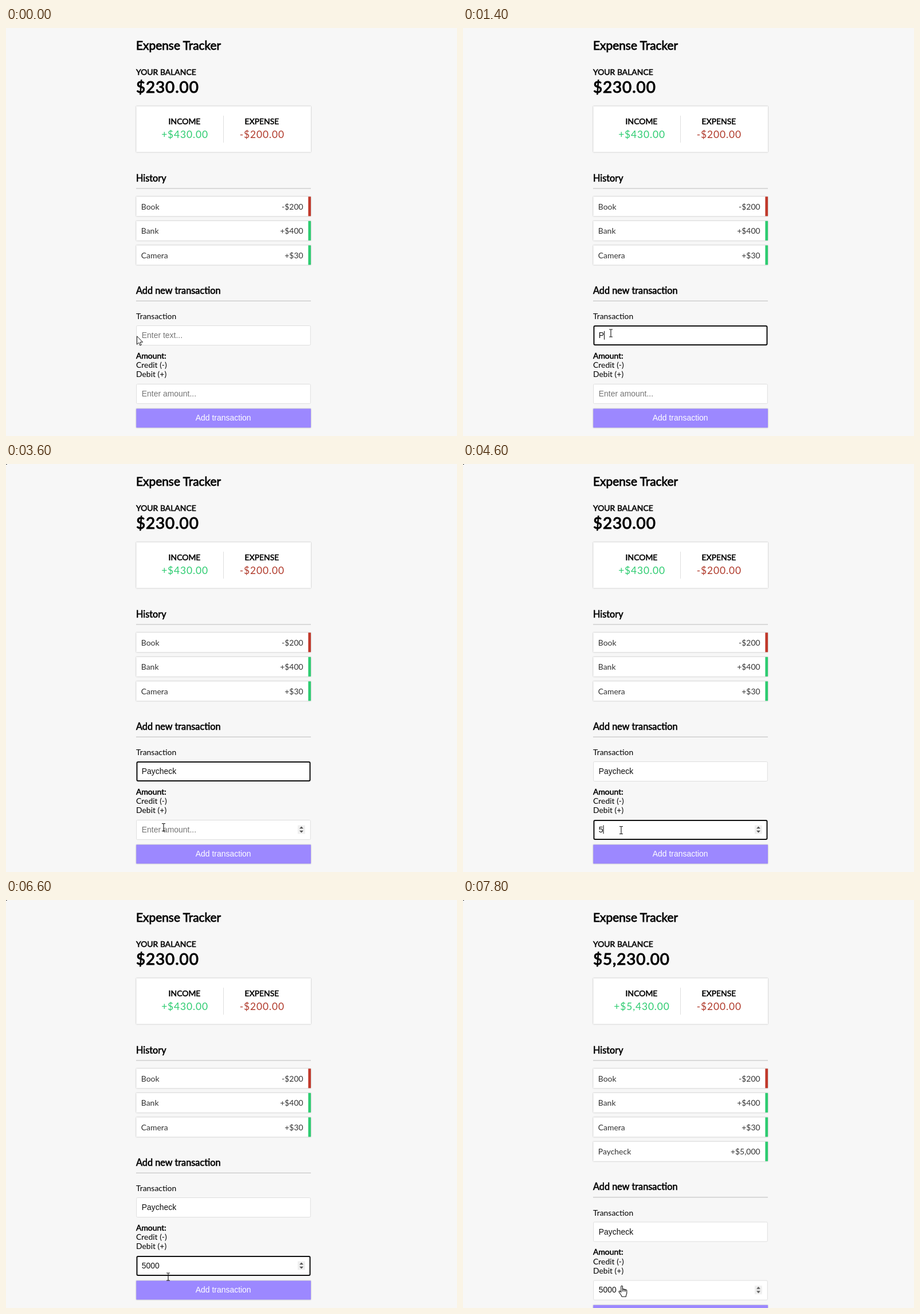
These frames come from a looping animation (787 by 712 pixels, 8000 ms). An HTML page:

```html
<!DOCTYPE html>
<html lang="en">
<head>
<meta charset="utf-8">
<title>Expense Tracker</title>
<style>
html, body { margin: 0; width: 100%; height: 100%; overflow: hidden; background: #f7f7f7; }
svg { display: block; width: 787px; height: 712px; font: 13.94px Lato, sans-serif; }
text { white-space: pre; }
.bold { stroke: #000; stroke-width: .038em; }
.h2 { font-size: 20.9px; }
.h1 { font-size: 27.88px; letter-spacing: .87px; }
.h3 { font-size: 16.3px; }
.money { font-size: 17.42px; letter-spacing: .87px; }
.mid { text-anchor: middle; }
.end { text-anchor: end; }
.field { font-family: "Liberation Sans", Arial, sans-serif; }
.card { fill: #fff; filter: drop-shadow(0 .9px .9px rgba(0,0,0,.3)); }
.row text { fill: #333; }
.rule { fill: #bbb; }
.box { fill: #fff; stroke: #dedede; }
.ring { fill: #fff; stroke: #101010; stroke-width: 2; }

.anim { animation: 8s step-end infinite; }
#ring1 { animation-name: ring1; }
#ring2 { animation-name: ring2; }
#spin { animation-name: spin; }
#form { animation-name: drop; }
#dot { animation-name: dot; }
.before { animation-name: before; }
.after { animation-name: after; }
#mouse { animation-name: move; }
#arrow { animation-name: arrow; }
#beam { animation-name: beam; }
#hand { animation-name: hand; }

@keyframes ring1 { 0% { opacity: 0 } 7.5% { opacity: 1 } 47.5%, 100% { opacity: 0 } }
@keyframes ring2 { 0% { opacity: 0 } 47.5% { opacity: 1 } 90%, 100% { opacity: 0 } }
@keyframes spin { 0% { opacity: 0 } 45% { opacity: 1 } 90% { opacity: 0 } 97.5%, 100% { opacity: 1 } }
@keyframes drop { 0% { transform: none } 97.5%, 100% { transform: translateY(42.5px) } }
@keyframes dot { 0% { opacity: 0 } 35%, 100% { opacity: 1 } }
@keyframes before { 0% { opacity: 1 } 97.5%, 100% { opacity: 0 } }
@keyframes after { 0% { opacity: 0 } 97.5%, 100% { opacity: 1 } }
@keyframes arrow { 0% { opacity: 1 } 2.5% { opacity: 0 } 40% { opacity: 1 } 45%, 100% { opacity: 0 } }
@keyframes beam { 0% { opacity: 0 } 2.5% { opacity: 1 } 40% { opacity: 0 } 45% { opacity: 1 } 85%, 100% { opacity: 0 } }
@keyframes hand { 0% { opacity: 0 } 85%, 100% { opacity: 1 } }
@keyframes move {
  0% { transform: translate(228px, 537px) }
  2.5% { transform: translate(246px, 534px) }
  5% { transform: translate(258px, 532.5px) }
  37.5% { transform: translate(260px, 545px) }
  40% { transform: translate(264px, 574px) }
  42.5% { transform: translate(270px, 609px) }
  45% { transform: translate(275px, 634px) }
  47.5% { transform: translate(276px, 639px) }
  82.5% { transform: translate(283px, 657.5px) }
  85% { transform: translate(282px, 669px) }
  87.5% { transform: translate(280px, 679px) }
  90%, 100% { transform: translate(279px, 683px) }
}
</style>
</head>
<body>
<svg viewBox="0 0 787 712">
  <rect id="dot" class="anim" width="1.5" height="1"/>

  <text class="bold h2" x="227" y="38">Expense Tracker</text>
  <text class="bold" x="227" y="82.3">YOUR BALANCE</text>
  <text class="bold h1 anim before" x="227" y="113">$230.00</text>
  <text class="bold h1 anim after" x="227" y="113">$5,230.00</text>

  <rect class="card" x="227.3" y="136.5" width="304.7" height="80"/>
  <rect x="379" y="153" width="1" height="47" fill="#dedede"/>
  <g class="mid">
    <text class="bold" x="311.5" y="167.5">INCOME</text>
    <text class="bold" x="446.5" y="167.5">EXPENSE</text>
    <g class="money">
      <text class="anim before" x="312" y="192" fill="#2ecc71">+$430.00</text>
      <text class="anim after" x="312" y="192" fill="#2ecc71">+$5,430.00</text>
      <text x="446.8" y="192" fill="#b03a2b">-$200.00</text>
    </g>
  </g>

  <text class="bold h3" x="227" y="267.5">History</text>
  <rect class="rule" x="227" y="279.5" width="305" height="1"/>
  <g id="rows"></g>

  <g id="form" class="anim">
    <text class="bold h3" x="227" y="463.7">Add new transaction</text>
    <rect class="rule" x="227" y="475.8" width="305" height="1"/>
    <text x="227" y="508">Transaction</text>
    <rect class="box" x="227.7" y="519.5" width="303.6" height="34" rx="1.7"/>
    <rect id="ring1" class="ring anim" x="228.5" y="520" width="302" height="33" rx="2"/>

    <text class="bold" x="227" y="576.7">Amount:</text>
    <text x="227" y="593">Credit (-)</text>
    <text x="227" y="609.4">Debit (+)</text>
    <rect class="box" x="227.7" y="621.5" width="303.6" height="34" rx="1.7"/>
    <rect id="ring2" class="ring anim" x="228.5" y="622" width="302" height="33" rx="2"/>
    <g id="spin" class="anim">
      <rect x="509" y="630.5" width="13" height="15" fill="#efefef"/>
      <path d="M512 636.3l3.5-3.8 3.5 3.8zM512 639.7l3.5 3.8 3.5-3.8z" fill="#505050"/>
    </g>

    <g class="field">
      <text id="name" x="236.8" y="541"></text>
      <text id="amount" x="236.8" y="642.5"></text>
    </g>
    <rect id="caret" width="1" height="15"/>

    <rect class="card" x="227.3" y="664.4" width="304.7" height="33" style="fill:#9c88ff"/>
    <text class="field mid" x="379.2" y="685" fill="#fff">Add transaction</text>
  </g>

  <g id="mouse" class="anim">
    <path id="arrow" class="anim" d="M.5.8v14.3l3.3-3.1 2.2 5 2.2-1-2.2-4.8h4.6z" fill="#fff" stroke="#111"/>
    <path id="beam" class="anim" d="M-3-6.5h2.2l.8.6.8-.6H3M-3 6.5h2.2l.8-.6.8.6H3M0-6V6" fill="none" stroke="#111" stroke-width="1.1"/>
    <path id="hand" class="anim" d="M-3.2-8.2c0-2 2.7-2 2.7 0v5c.3-1.4 2.4-1.2 2.5.2.5-1.1 2.3-.8 2.4.6.7-.9 2.4-.4 2.4 1V3c0 2-1.4 3-1.5 6.2h-7.2C-2.4 6.6-5.2 3.6-6.6 1.4c-1-1.7 1-2.7 2.2-1.4l1.2 1.4zM-.5-3.2v3.4M2-2.8v3M4.4-2.2v2.6" fill="#fff" stroke="#111" stroke-width="1.1" stroke-linejoin="round"/>
  </g>
</svg>
<script>
const $ = id => document.getElementById(id);
const LOOP = 8000;

const items = [["Book", "-$200"], ["Bank", "+$400"], ["Camera", "+$30"], ["Paycheck", "+$5,000"]];
$("rows").innerHTML = items.map(([label, sum], i) => `
  <g class="row ${i === 3 ? "anim after" : ""}" transform="translate(0 ${294.3 + i * 42.5})">
    <rect class="card" x="227.3" width="304.7" height="34"/>
    <rect x="527.4" width="4.6" height="34" fill="${sum[0] === "-" ? "#c0392b" : "#2ecc71"}"/>
    <text x="235.8" y="22.7">${label}</text>
    <text class="end" x="518.6" y="22.7">${sum}</text>
  </g>`).join("");

// Each key lists [time, letters shown]
const fields = [
  { el: $("name"), word: "Paycheck", hint: "Enter text...",
    keys: [[1400, 1], [1600, 2], [1800, 4], [2000, 6], [2200, 7], [2400, 8]] },
  { el: $("amount"), word: "5000", hint: "Enter amount...",
    keys: [[4600, 1], [4800, 2], [5600, 3], [5800, 4]] }
];
const carets = [
  { from: 600, to: 3800, off: [[1000, 1200], [3400, 3800]] },
  { from: 3800, to: 7200, off: [[4200, 4600], [5200, 5600], [6200, 7200]] }
];

function fill({ el, word, hint, keys }, t) {
  const count = keys.reduce((n, [at, shown]) => t >= at ? shown : n, 0);
  el.textContent = count ? word.slice(0, count) : hint;
  el.setAttribute("fill", count ? "#111" : "#757575");
  return count ? el.getComputedTextLength() : 0;
}

function draw(t) {
  const widths = fields.map(f => fill(f, t));
  const i = carets.findIndex(c => t >= c.from && t < c.to);
  const on = i >= 0 && !carets[i].off.some(([a, b]) => t >= a && t < b);
  $("caret").setAttribute("opacity", on ? 1 : 0);
  if (on) {
    $("caret").setAttribute("x", 236.8 + widths[i]);
    $("caret").setAttribute("y", i ? 630.3 : 528.8);
  }
}

let start;
function tick(now) {
  start ??= now;
  draw((now - start) % LOOP);
  requestAnimationFrame(tick);
}
draw(0);
requestAnimationFrame(tick);
</script>
</body>
</html>
```
